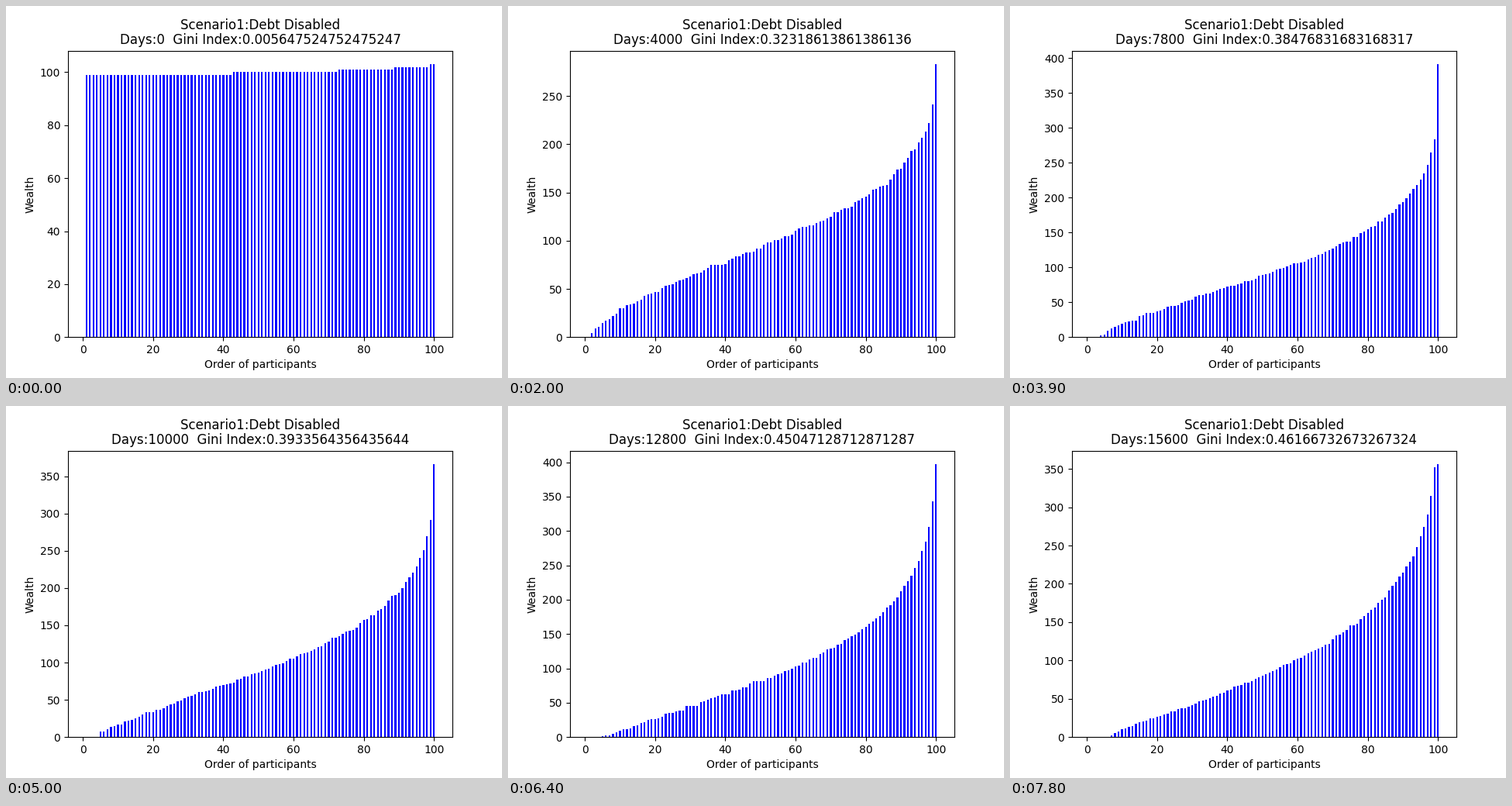
Recreate the animation shown at these times as a matplotlib script. Size 640 by 480 pixels, loop 7900 ms.

```python
from math import gamma

import numpy as np
import matplotlib.pyplot as plt
from matplotlib.animation import FuncAnimation

plt.rcParams["text.hinting"] = "force_autohint"

PEOPLE, FRAMES, DAYS_PER_FRAME = 100, 79, 200
MEAN = 100
ranks = np.arange(1, PEOPLE + 1)
TOTAL = PEOPLE * (PEOPLE + 1) * MEAN

# Key moments: inequality (Gini times TOTAL) and the richest participant.
moments = [0, 12, 27, 39, 50, 64, 78]
inequality = [5704, 271464, 365890, 388616, 397290, 454976, 466284]
richest = [103, 215, 332, 391, 366, 397, 356]


def diffuse(frame, values):
    """Interpolate in square-root time, the pace of a random walk."""
    return np.interp(np.sqrt(frame), np.sqrt(moments), values)


def gini_at(frame):
    return 2 * int(round(diffuse(frame, inequality) / 2)) / TOTAL


def wealth_at(frame):
    """Sorted wealth: bell-shaped at first, then ever more skewed."""
    if frame == 0:
        return np.repeat(np.arange(99, 104), [42, 30, 16, 10, 2])
    gini = gini_at(frame)
    skew = max(0.28, 2 * gini - 0.18)
    quantile = (-np.log(1 - (ranks - 0.5) / PEOPLE)) ** skew
    center = gamma(1 + skew)
    spread = gini * MEAN / (center * (1 - 2 ** -skew))
    rng = np.random.default_rng(frame)
    rough = rng.normal(0, 0.012, PEOPLE)
    wealth = MEAN + spread * (quantile - center + rough)
    top = diffuse(frame, richest)
    wealth = np.sort(np.clip(wealth, 0, top))
    wealth[-1] = top
    return np.round(wealth)


fig, ax = plt.subplots(figsize=(6.4, 4.8), dpi=100)
bars = ax.bar(ranks, wealth_at(0), width=0.5, color="b")
ax.set_xlabel("Order of participants")
ax.set_ylabel("Wealth")


def update(i):
    wealth = wealth_at(i)
    for bar, height in zip(bars, wealth):
        bar.set_height(height)
    ax.set_ylim(0, wealth[-1] * 1.05)
    ax.set_title("Scenario1:Debt Disabled\n"
                 f"Days:{i * DAYS_PER_FRAME}  Gini Index:{gini_at(i)}",
                 linespacing=1.1)
    return bars


anim = FuncAnimation(fig, update, frames=FRAMES, interval=100,
                     repeat=True, repeat_delay=0)
plt.show()
```
